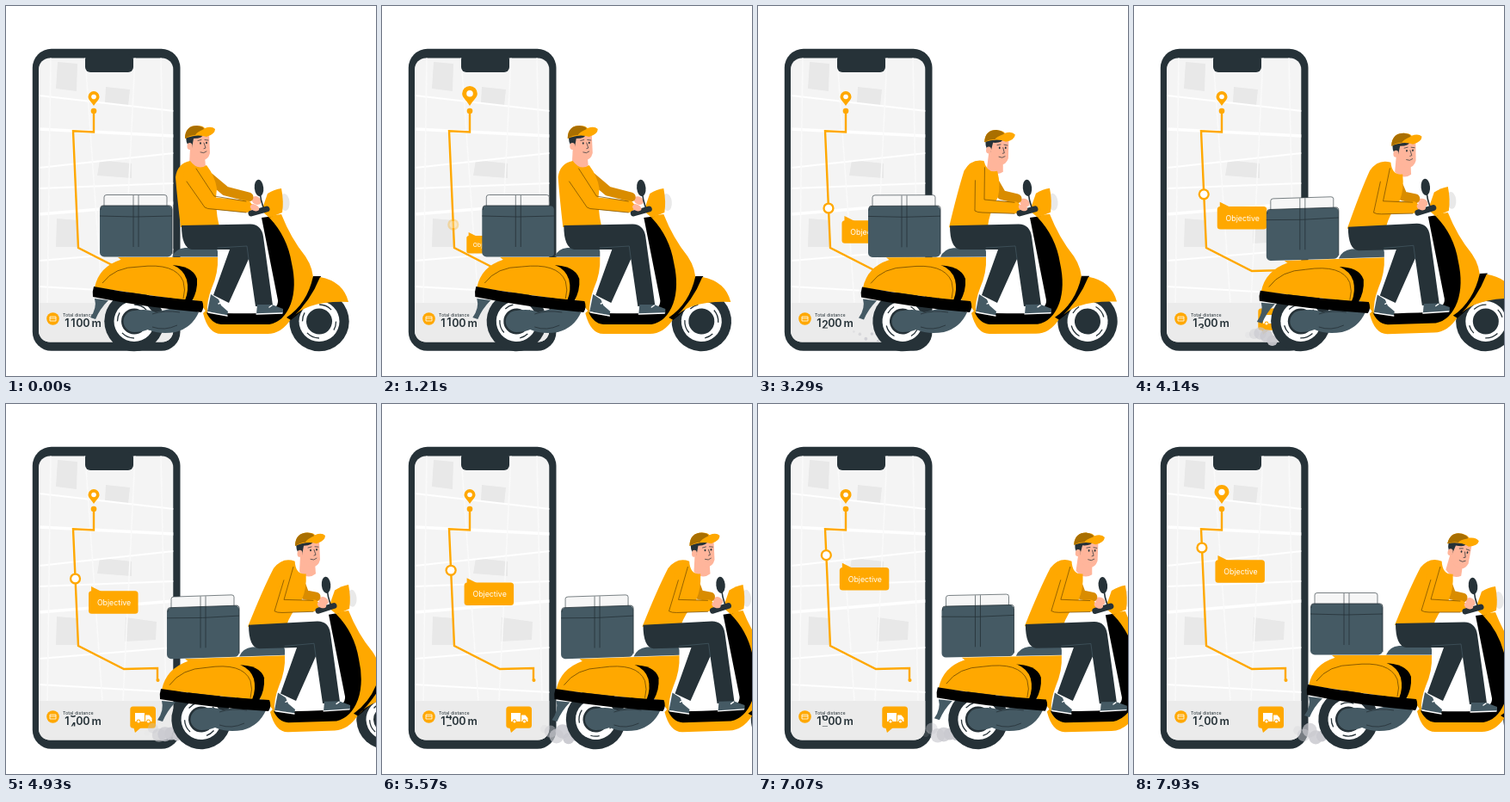
Recreate the animation shown at these times as an HTML page with a canvas. Size 430x430 px, loop 8000 ms.

```html
<!DOCTYPE html>
<html lang="en">
<head>
<meta charset="utf-8">
<title>Delivery</title>
<style>
html, body { margin: 0; width: 100%; height: 100%; overflow: hidden; background: #fff; }
canvas { display: block; width: 430px; height: 430px; }
</style>
</head>
<body>
<canvas id="stage"></canvas>
<script>
const ORANGE = '#ffa800', SHADE = '#d98c00', DARK = '#263238', SLATE = '#455a64', SKIN = '#ffb59b';
const LOOP = 8000;
const canvas = document.getElementById('stage');
const ctx = canvas.getContext('2d');
const dpr = window.devicePixelRatio || 1;
canvas.width = canvas.height = 430 * dpr;

// Monotone cubic interpolation through [time, value] pairs.
function curve(...keys) {
  const n = keys.length - 1;
  const slope = i => (keys[i + 1][1] - keys[i][1]) / (keys[i + 1][0] - keys[i][0]);
  const tangent = i => {
    if (i === 0) return slope(0);
    if (i === n) return slope(n - 1);
    const a = slope(i - 1), b = slope(i);
    return a * b > 0 ? 2 * a * b / (a + b) : 0;
  };
  return t => {
    if (t <= keys[0][0]) return keys[0][1];
    if (t >= keys[n][0]) return keys[n][1];
    let i = 0;
    while (t > keys[i + 1][0]) i++;
    const d = keys[i + 1][0] - keys[i][0], u = (t - keys[i][0]) / d, v = 1 - u;
    return v * v * (1 + 2 * u) * keys[i][1] + u * u * (3 - 2 * u) * keys[i + 1][1]
      + d * u * v * (v * tangent(i) - u * tangent(i + 1));
  };
}

const drive = curve([0, 0], [1210, 7.3], [2290, 14], [3290, 19], [3500, 22], [4930, 78], [6210, 111], [7930, 100]);
const squat = curve([3200, 0], [4300, .0325], [6400, .0325], [7800, 0]);
const lean = curve([0, 0], [1210, .3], [2290, 4.5], [3290, 22.5], [4930, 34], [6210, 34], [7930, 34]);
const nod = curve([0, 0], [2290, 0], [3290, 4], [4930, 0], [6210, 0], [7930, 13]);
const boxShift = curve([5000, 0], [6210, -1], [7930, -4]);
const ringY = curve([1000, 256], [1210, 254], [2290, 246], [3290, 235], [4930, 203], [6210, 185], [7930, 167]);
const pinScale = curve([0, 1], [950, 1.5], [1210, 1.36], [1800, 1.1], [2290, 1.1], [2720, 1.35], [3290, 1], [7000, 1], [7930, 1.3]);
const counter = curve([1210, 1], [2290, 1.35], [3290, 1.87], [4930, 3.5], [6210, 5.2], [7930, 7.35]);
const ramp = (t, from, to) => Math.min(1, Math.max(0, (t - from) / (to - from)));

function fill(color, d) { ctx.fillStyle = color; ctx.fill(new Path2D(d)); }
function line(color, width, d) {
  ctx.strokeStyle = color; ctx.lineWidth = width;
  ctx.stroke(new Path2D(d));
}
function box(color, x, y, w, h, r = 0) {
  ctx.fillStyle = color; ctx.beginPath(); ctx.roundRect(x, y, w, h, r); ctx.fill();
}
function oval(color, x, y, rx, ry = rx, turn = 0) {
  ctx.fillStyle = color; ctx.beginPath(); ctx.ellipse(x, y, rx, ry, turn, 0, 7); ctx.fill();
}
function text(s, x, y, font, color, align = 'left') {
  ctx.font = font; ctx.fillStyle = color; ctx.textAlign = align; ctx.fillText(s, x, y);
}
function group(draw) { ctx.save(); draw(); ctx.restore(); }
function rotateAt(x, y, degrees) {
  ctx.translate(x, y); ctx.rotate(degrees * Math.PI / 180); ctx.translate(-x, -y);
}

function drawPhone(t) {
  box(DARK, 30.8, 49.8, 171.7, 351, 22);
  group(() => {
    ctx.beginPath(); ctx.roundRect(38, 60.5, 156.3, 330, 13); ctx.clip();
    box('#f4f4f4', 38, 60, 157, 331);
    fill('#e8e8e8', 'M60 65l23 2-1 32-24-3zM116 94l28 3-2 19-27-4zM109 179l37 4v17l-40-3zM59 247l25 2v31h-26zM139 248l36 5-1 21-36 2z');
    line('#fff', 3.5, 'M38 143L195 151M38 242L195 229');
    line('#fff', 2, 'M38 104L195 122M38 188L195 171M38 212L195 206M38 296L195 283M38 326L195 335');
    line('#fafafa', 1.5, 'M92 60L112 345M150 60L136 345M52 60L48 345M180 60L186 345');
    box('#ebebeb', 38, 345, 157, 46);
  });
  box(DARK, 92, 56, 56, 21, 6);

  line(ORANGE, 2.4, 'M102 122V146.5L78 145.3L84 281L137 308L176 307V321');
  oval(ORANGE, 102, 122, 3.3);
  oval(ORANGE, 176.5, 321, 2);
  group(() => {
    ctx.translate(102, 116); ctx.scale(pinScale(t), pinScale(t));
    fill(ORANGE, 'M0 0C-3 -5-6.5 -7-6.5 -10.5A6.5 6.5 0 0 1 6.5 -10.5C6.5 -7 3 -5 0 0z');
    oval('#fff', 0, -10.5, 2.8);
  });
  drawMarker(t);

  oval(ORANGE, 54.5, 363.5, 7.3);
  line('#fff', .8, 'M51 361h7v5h-7zM51 363h7');
  text('Total distance', 66, 360.5, '5.4px Inter, sans-serif', DARK);
  drawCounter(t);

  box(ORANGE, 144.3, 351.5, 29.7, 25.3, 3.5);
  fill(ORANGE, 'M148 375l2 7 7-6z');
  fill('#fff', 'M150 359h11v10h-11zM162 361.5h4.5l3 3.5v4h-7.5z');
  for (const x of [154, 165.5]) { oval(ORANGE, x, 369, 2.4); oval('#fff', x, 369, 1.5); }
}

function drawMarker(t) {
  const y = ringY(t), x = 78 + (y - 146) / 22.5, grow = ramp(t, 950, 1290);
  if (!grow) return;
  group(() => {
    ctx.translate(x + 15.5, y + 9); ctx.scale(grow, grow);
    box(ORANGE, 0, 5.3, 57.5, 26.5, 3.5);
    fill(ORANGE, 'M3 0L15 6H3z');
    text('Objective', 29.5, 22, '8.8px Inter, sans-serif', '#fff', 'center');
  });
  group(() => {
    ctx.globalAlpha = ramp(t, 1080, 1500);
    oval(ORANGE, x, y, 6.6);
    oval('#fff', x, y, 4.3);
  });
}

function drawCounter(t) {
  const font = '600 12.6px Inter, sans-serif', value = counter(t);
  text('1', 71, 372.5, font, DARK, 'center');
  text('0', 85.5, 372.5, font, DARK, 'center');
  text('0', 93.3, 372.5, font, DARK, 'center');
  text('m', 99.5, 372.5, font, DARK);
  group(() => {
    ctx.beginPath(); ctx.rect(73, 362, 8.5, 12.5); ctx.clip();
    for (let d = Math.floor(value); d <= value + 1; d++)
      text(d % 10, 78, 372.5 + (d - value) * 16, font, DARK, 'center');
  });
}

function drawSmoke(t, x) {
  const amount = ramp(t, 3000, 4300);
  for (let i = 0; i < 6; i++) {
    const p = (t / 1100 + i / 6) % 1;
    group(() => {
      ctx.globalAlpha = 1 - p * p;
      oval('#c9c9cf', x - 22 - 42 * p, 388 - 9 * p + 4 * Math.sin(i * 2.4),
        amount * (3 + 5.5 * Math.sin(Math.PI * p)));
    });
  }
}

function drawWheel(x, t) {
  group(() => {
    ctx.translate(x, 366.5); ctx.rotate(t / 170);
    oval(DARK, 0, 0, 34.7);
    oval('#fff', 0, 0, 23.5);
    oval(DARK, 0, 0, 15);
    line(DARK, 1.3, 'M0 -19.5A19.5 19.5 0 0 1 14 -13.5M0 19.5A19.5 19.5 0 0 1 -14 13.5M-19.5 0A19.5 19.5 0 0 1 -17 -10M19.5 0A19.5 19.5 0 0 1 17 10');
  });
}

function drawCargo() {
  box('#f6f6f6', 114, 219.5, 73, 15, 2);
  line(DARK, .6, 'M114 233V222Q114 219.5 117 219.5H184Q187 219.5 187 222V233M148 220V233M154 220V233');
  box(SLATE, 109, 232, 84, 59.5, 5);
  line(DARK, .8, 'M109 244Q150 246 193 244M148 232V280M154 232V280M110 237V234Q110 232 113 232H190Q193 232 193 236V288');
}

function drawRider(t) {
  // The spine stretches a little as it leans, so height drops more slowly than a pure rotation.
  const angle = lean(t) * Math.PI / 180, k = lean(t) / 34;
  const c = Math.cos(angle), s = Math.sin(angle), rise = Math.cos(angle * .8);
  const lift = (x, y) => [224 + (x - 224) * c - (y - 255) * s, 255 + (x - 224) * s + (y - 255) * rise];
  const at = (p, dx = 0, dy = 0) => `${p[0] + dx} ${p[1] + dy} `;

  // far arm
  const farElbow = [255 + 14 * k, 215 + 7 * k];
  ctx.lineJoin = ctx.lineCap = 'round';
  oval(SKIN, 291, 226 + 4 * k, 6, 4.5, .5);
  line(SHADE, 11, 'M' + at(lift(236, 199)) + 'L' + at(farElbow) + 'L' + `282 ${222 + 3 * k}`);

  // head
  const [hx, hy] = lift(226, 165);
  group(() => {
    ctx.translate(hx - 226, hy - 165);
    rotateAt(224, 180, nod(t));
    fill(SKIN, 'M214 165L213 184Q223 194 232 187L231 174z');
    fill(SKIN, 'M213 150L236 149L237 171Q235 179 228 179Q219 178 215 168z');
    fill(DARK, 'M209 152L229 149Q229 154 218 154L216 165L212 163Q209 158 209 152z');
    oval(SKIN, 213.5, 163, 3, 4);
    fill(ORANGE, 'M208 154C208 143 214 139 222 139Q229 139 231 142Q239 139 243 143Q243 149 233 152Q222 148 208 154z');
    fill('#a96f00', 'M208 154C208 143 214 139 222 139Q230 140 230 143Q221 147 220 150Q214 150 208 154z');
    oval(DARK, 226, 159.5, .9, 1.3);
    oval(DARK, 233, 159, .9, 1.3);
    line(DARK, .7, 'M223 156.5l4-1M231 155.5l4 .5M230 159l2 6-2 .7M226 170q4 2 7-1');
  });

  // torso
  fill(ORANGE, 'M203 257Q' + at(lift(199, 224)) + at(lift(197, 199)) + 'Q' + at(lift(199, 183)) + at(lift(214, 180))
    + 'Q' + at(lift(223, 192)) + at(lift(233, 185)) + 'Q' + at(lift(243, 198)) + at(lift(245, 212))
    + 'Q' + at(lift(242, 232)) + '248 257z');

  // legs
  fill(DARK, 'M204 255L284 253.5Q297 254 299 268L310 348L290 349L282 294L259 345L241 336L260 283L216 283Q204 281 204 255z');
  line(SLATE, .7, 'M246 281L280 279L282 294');
  fill(SLATE, 'M238 335L247 341L250 348L258 355L257 360L234 355z');
  fill(SLATE, 'M292 347L309 347L322 352L322 357L291 358z');
  line('#fff', 1.4, 'M235 356L257 360M291 358L321 357M247 346L251 344M306 350L309 348');

  // near arm
  const shoulder = lift(213, 196), elbow = [237 + 3 * k, 229 + 6 * k], wrist = [279, 234 + 2 * k];
  oval(SKIN, 286, 235 + 2 * k, 7, 5, .2);
  line(ORANGE, 14, 'M' + at(shoulder) + 'L' + at(elbow) + 'L' + at(wrist, 0, -1));
  line('#6b4700', .7, 'M' + at(shoulder, 8, -7) + 'L' + at(elbow, 5, -8) + 'L' + at(wrist, 0, -7)
    + 'M' + at(shoulder, -3, 8) + 'L' + at(elbow, -6, 5) + 'Q' + at(elbow, -3, 7) + at(elbow, 3, 7) + 'L' + at(wrist, 0, 6));
}

function drawBody(t) {
  fill(SLATE, 'M103 340L119 342Q109 352 104 364L98 362Q106 351 103 340z');
  fill('#000', 'M297 246L312 244Q334 278 339 318Q337 350 318 372H243Q233 367 231 355Q240 358 300 357Q317 352 316 342Z');
  fill(ORANGE, 'M312 243L320 242Q331 270 348 291Q358 306 357 322Q350 347 331 364Q320 381 304 381H250Q235 381 229 357L232 354Q238 369 250 370H306Q323 367 331 346Q338 326 332 299Q327 268 306 246z');
  fill(ORANGE, 'M130 292H246Q247 310 239 328Q233 343 234 357L224 344L170 325z');
  fill('#000', 'M188 301Q217 301 222 317Q223 331 216 343L190 340z');
  fill(ORANGE, 'M103 327Q108 303 133 295Q202 290 210 318Q213 330 208 342z');
  line('#6b4700', .8, 'M112 322Q126 303 155 303Q197 298 206 320Q209 330 206 340');
  fill('#000', 'M102 326Q160 337 228 343Q231 350 227 356Q160 350 101 338Q100 332 102 326z');
  fill(SLATE, 'M193 291.5Q197 282 208 281H241Q246 281 246 286V291.5z');

  // front fender
  fill('#000', 'M357 314H366Q358 345 331 365L326 362Q350 346 357 314z');
  fill(ORANGE, 'M365 315Q392 320 398 344Q349 342 331 364Q354 343 365 315z');
  group(() => { ctx.translate(boxShift(t), 0); drawCargo(); });
}

function drawSteering() {
  oval('#e9e9e9', 324, 228, 5.5, 10, -.1);
  fill(ORANGE, 'M297 238L304 218Q312 213 320 212Q323 227 321 240L306 246z');
  line(DARK, 1.6, 'M295 216Q296 226 299 234');
  oval(DARK, 294, 211.5, 5.2, 9.7, -.1);
  line(DARK, 7, 'M285 241L303 236');
  oval(SKIN, 289, 234.5, 5.5, 3.6, .4);
}

function drawScooter(t) {
  const x = drive(t), slope = squat(t);
  drawSmoke(t, x + 149);
  group(() => {
    ctx.translate(x, 0);
    drawWheel(149, t);
    drawWheel(364, t);
    fill(SLATE, 'M149 354Q164 351 174 356L206 348L224 356Q216 374 197 379Q178 382 165 376Q158 379 149 379A12.5 12.5 0 0 1 149 354z');
    line(DARK, .8, 'M170 358Q185 353 202 356M170 373Q184 378 199 371');
    // Under acceleration the rear sinks: a vertical shear around x = 257.
    ctx.transform(1, -slope, 0, 1, 0, 257 * slope);
    drawBody(t);
    drawRider(t);
    drawSteering();
  });
}

function render(now) {
  const t = now % LOOP;
  ctx.setTransform(dpr, 0, 0, dpr, 0, 0);
  ctx.fillStyle = '#fff';
  ctx.fillRect(0, 0, 430, 430);
  drawPhone(t);
  drawScooter(t);
}

const start = performance.now();
function tick() {
  render(performance.now() - start);
  requestAnimationFrame(tick);
}
tick();
</script>
</body>
</html>
```
